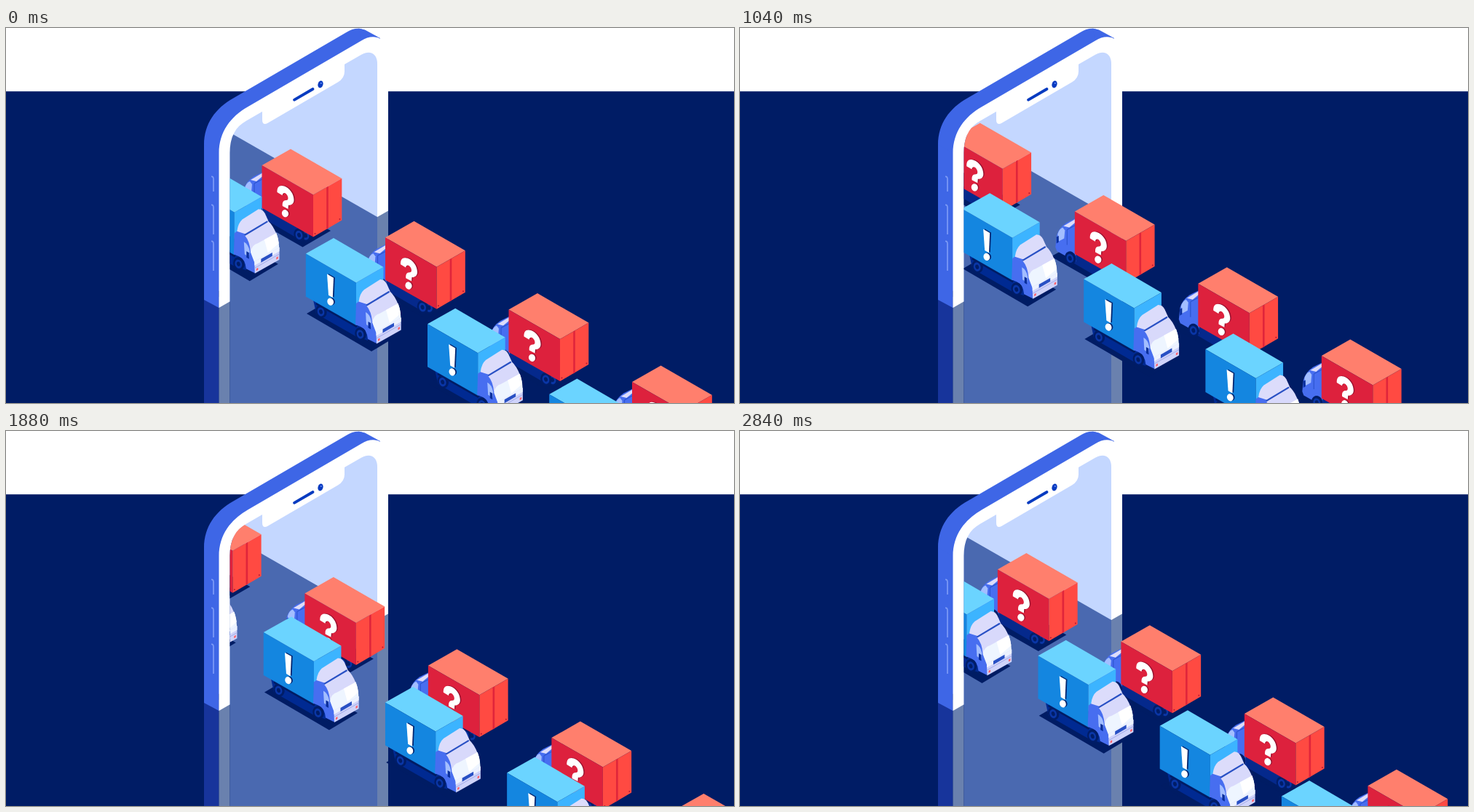
An HTML page that plays this animation: 1000x516 px, repeating every 2.88 s.

```html
<!DOCTYPE html>
<html lang="en">
<head>
<meta charset="utf-8">
<title>Trucks through a phone</title>
<style>
html, body { margin: 0; width: 100%; height: 100%; overflow: hidden; background: #fff; }
svg { display: block; width: 1000px; height: 516px; }
</style>
</head>
<body>
<svg viewBox="0 0 1000 516" xmlns="http://www.w3.org/2000/svg">
  <defs>
    <path id="face" d="M292.500 385V172C292.500 143 309 121.500 332 108.500L488 17.400C506 6 525 13 525 42V251.500Z"/>
    <path id="screen" d="M307.500 376.500V172C307.500 150 315 136 330 127.700L352 115V126Q352 135 360 130.500L456 74.500Q465 69 465 60V50L488 36.700C500 30 510 35 510 49V260Z"/>
    <clipPath id="gate"><path d="M307.500 516V172C307.500 150 315 136 330 127.700L545 3H1000V516Z"/></clipPath>

    <g id="wheel">
      <ellipse rx="7.600" ry="9.200" transform="rotate(-18)" fill="#001d68"/>
      <ellipse cx="-.6" cy=".3" rx="4.800" ry="6.200" transform="rotate(-18)" fill="#0a36a6"/>
      <ellipse cx="-.6" cy=".3" rx="2.400" ry="3.200" transform="rotate(-18)" fill="#001d68"/>
    </g>

    <g id="ask" fill="currentColor">
      <path d="M372.500 226C372 218.500 376 215.500 382 217.500C390 220 395.500 229 395.500 236.500C395.500 242 392 244 388 243.700L387.500 249L379.800 245C379.300 239.500 381 236.800 385 237C388 237 388 233.500 386.500 230.500C384 226 380.500 226 379.500 230.200Z"/>
      <ellipse cx="383.500" cy="255.200" rx="4.500" ry="5.200" transform="rotate(-20 383.500 255.200)"/>
    </g>

    <g id="bang" fill="currentColor">
      <path d="M441 338.500L450 343.700L448.800 371L443 367.700Z"/>
      <ellipse cx="445.700" cy="376.700" rx="4.300" ry="5.200" transform="rotate(-20 445.700 376.700)"/>
    </g>

    <g id="red">
      <path d="M319 251L358 229L446 279L407.500 301.500Z" fill="#001c64"/>
      <path d="M340 238L416 281V292L398 288L350 260Z" fill="#05298c"/>
      <use href="#wheel" x="412" y="285"/>
      <use href="#wheel" x="403" y="284.500"/>
      <path d="M353 198L340 204.500Q330 211 326.700 222L325 238L327 243.500L353 258Z" fill="#476ef0"/>
      <path d="M336 209L353 199V203.500L344 211Z" fill="#dcdcfb"/>
      <path d="M328 220Q330 213 335 211L338 215L337 226L329.500 230Z" fill="#a3beff"/>
      <path d="M341 214L353 207.500M341 214V235" fill="none" stroke="#2d55d0" stroke-width="1.200"/>
      <path d="M326.500 224L329.500 222.500V231L326.500 233Z" fill="#0a2f9c"/>
      <use href="#wheel" x="345.500" y="253"/>
      <path d="M391 166.500L461.300 207L422 229.500L351.500 189Z" fill="#ff7f6d"/>
      <path d="M351.500 189L422 229.500V287.500L351.500 247.500Z" fill="#dd213d"/>
      <path d="M422 229.500L461.300 207V264.500L422 287.500Z" fill="#ff4a42"/>
      <path d="M440.200 219.200L442.800 217.700V275.400L440.200 276.900Z" fill="#e0253b"/>
      <circle cx="424.500" cy="283" r="1" fill="#b81632"/>
      <circle cx="458.500" cy="263" r="1" fill="#b81632"/>
      <use href="#ask" x="1.500" y="-.4" color="#9a1230"/>
      <use href="#ask" color="#fff"/>
    </g>

    <g id="blue">
      <path d="M413 393L452 370L541 421.500L502 445Z" fill="#001c64"/>
      <path d="M422 374L482 407L497 420V430L480 424L426 393Z" fill="#002a92"/>
      <path d="M426 379L482 411" stroke="#001c64" stroke-width="3"/>
      <use href="#wheel" x="433" y="390"/>
      <path d="M450 289L518.500 329L481 350.500L411.800 310.500Z" fill="#6bd4ff"/>
      <path d="M411.800 310.500L481 350.500V409L411.800 369.500Z" fill="#1486e0"/>
      <path d="M481 350.500L518.500 329V380L481 409Z" fill="#3cb4ff"/>
      <path d="M481 379L486 375L502 381L514 400L509 434L497 428Q496 415 487 411L480 408Z" fill="#476ef0"/>
      <path d="M484.500 376.500Q486 365 492 360L514 346Q520 346 523 352L527.500 362L497 380.500Z" fill="#dcdcfb"/>
      <path d="M495 382L527 362Q534 368 539 381L511 398L503 404Q502 390 495 382Z" fill="#d8d9fb"/>
      <path d="M495 381.700L526.500 362.800" stroke="#2850c4" stroke-width="2.200"/>
      <path d="M503 405Q505 395 513 393L538.500 379Q542 388 542.500 400L508.500 419.500Z" fill="#eef5ff"/>
      <path d="M522 388L538.500 379Q541 385 542 393L527 406Z" fill="#fff"/>
      <path d="M494 391Q500 394 502 404L501 412L495 408Z" fill="#a3beff"/>
      <path d="M508.500 418L542.700 398.500V415.500L509 434.500Z" fill="#cfd3fa"/>
      <path d="M508.500 418L542.700 398.500V404L508.500 423.500Z" fill="#edf2ff"/>
      <path d="M517.500 414.500L533 405.700V410.500L517.500 419.500Z" fill="#2850c4"/>
      <path d="M509 427L542.700 407.700" stroke="#a4abe9"/>
      <path d="M511 428L513.500 426.500V429.500L511 431ZM538.500 412.500L541 411V414L538.500 415.500Z" fill="#ff5f68"/>
      <path d="M497.500 404L501 406V414.500L497.500 412.500Z" fill="#0a2f9c"/>
      <use href="#wheel" x="487" y="421"/>
      <use href="#bang" x="1.800" y="-.5" color="#00256f"/>
      <use href="#bang" color="#fff"/>
    </g>
  </defs>

  <rect width="1000" height="516" fill="#fff"/>
  <rect y="87.200" width="1000" height="428.800" fill="#001c65"/>

  <!-- reflection -->
  <path d="M272 370H292.500V516H272Z" fill="#17349b"/>
  <path d="M292.500 370H307.500V516H292.500ZM510 240H525V516H510Z" fill="#6a81ae"/>

  <!-- phone -->
  <use href="#face" x="-20.500" y="-11.500" fill="#3e66e6"/>
  <path d="M272 374L292.500 385V172L272 160ZM484 .8L493 2.500L514 14L495 40Z" fill="#3e66e6"/>
  <use href="#face" fill="#fff"/>
  <use href="#screen" fill="#c4d7ff"/>
  <path d="M300 139.500L510 260V516H300Z" fill="#4a69b0" clip-path="url(#gate)"/>
  <path d="M396 98.800L421.500 84" stroke="#083bc0" stroke-width="3.800" stroke-linecap="round"/>
  <ellipse cx="432" cy="77.500" rx="3.500" ry="5" transform="rotate(18 432 77.500)" fill="#083bc0"/>
  <circle cx="432.800" cy="76" r="1" fill="#6f93ff"/>
  <path d="M282 204.500Q285 204 285 208V225M282 243.500Q285 243 285 247V284M282 293.500Q285 293 285 297V334" fill="none" stroke="#7d9bf6" stroke-width="1.700"/>

  <g id="traffic" clip-path="url(#gate)"></g>
</svg>
<script>
const LOOP = 2880, TICK = 40;
const lanes = [
  { id: 'red', dx: 169.5, dy: 99.3, dir: -1, first: 0, last: 5 },
  { id: 'blue', dx: 167.2, dy: 96.7, dir: 1, first: -2, last: 3 }
];
const traffic = document.getElementById('traffic');
const trucks = [];

for (const lane of lanes) {
  for (let slot = lane.first; slot <= lane.last; slot++) {
    const el = document.createElementNS('http://www.w3.org/2000/svg', 'use');
    el.setAttribute('href', '#' + lane.id);
    traffic.append(el);
    trucks.push({ el, lane, slot });
  }
}

function draw(ms) {
  const phase = Math.floor((ms % LOOP) / TICK) * TICK / LOOP;
  for (const { el, lane, slot } of trucks) {
    const pos = slot + lane.dir * phase;
    el.setAttribute('transform', `translate(${pos * lane.dx} ${pos * lane.dy})`);
  }
}

const start = performance.now();
function frame() {
  draw(performance.now() - start);
  requestAnimationFrame(frame);
}
frame();
</script>
</body>
</html>
```
